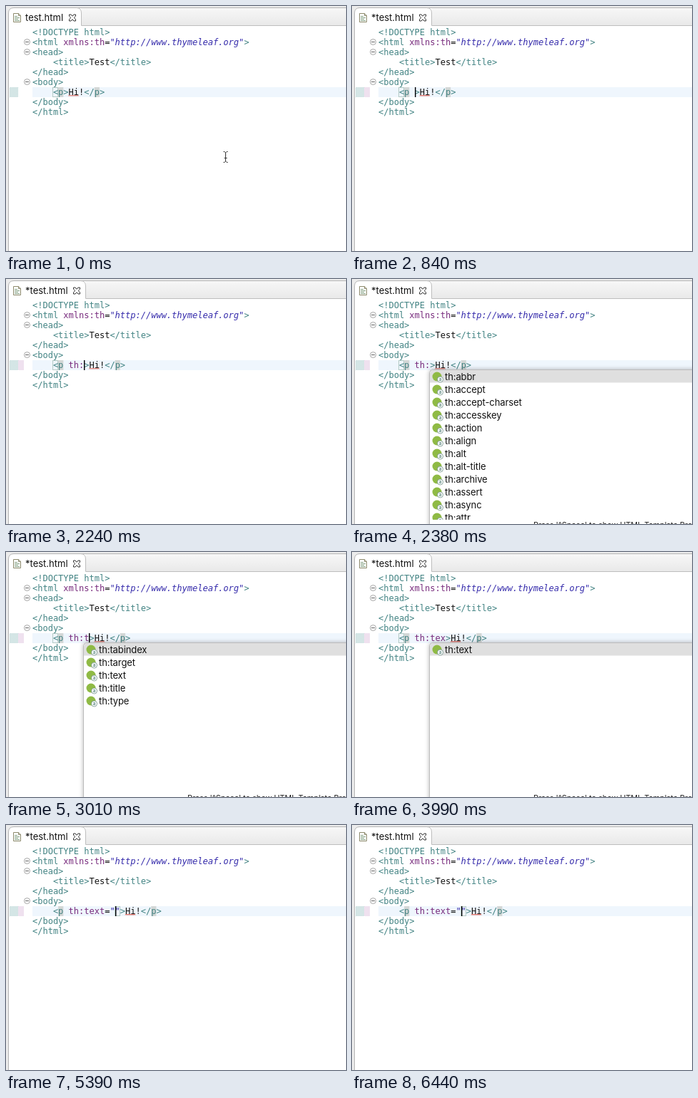
An HTML page for the animation above (6.51 s loop, 476x344 px).

```html
<!DOCTYPE html>
<html lang="en">
<head>
<meta charset="utf-8">
<title>Attribute completion</title>
<style>
  html, body { margin: 0; width: 100%; height: 100%; overflow: hidden; background: #fff; }
  svg { display: block; }
  .code { font: 12px "DejaVu Sans Mono", monospace; fill: #111; white-space: pre; }
  .ui { font: 13px Inter, sans-serif; fill: #111; white-space: pre; }
  .hint { font: 10.8px Inter, sans-serif; fill: #222; }
  .tag { fill: #428383; }
  .attr { fill: #782b7d; }
  .str { fill: #352bab; font-style: italic; }
</style>
</head>
<body>
<svg id="stage" width="476" height="344" viewBox="0 0 476 344">
  <defs>
    <linearGradient id="bar" x1="0" y1="0" x2="0" y2="1">
      <stop offset="0" stop-color="#f7f7f7"/><stop offset="1" stop-color="#e9e9e9"/>
    </linearGradient>
    <pattern id="hatch" width="2" height="2" patternUnits="userSpaceOnUse">
      <path d="M0 0h1v1h-1zM1 1h1v1h-1z" fill="#a9cccc"/>
    </pattern>
    <clipPath id="list"><rect x="109" y="128" width="367" height="210"/></clipPath>
    <filter id="blur" x="-10%" y="-10%" width="120%" height="120%"><feGaussianBlur stdDeviation="3"/></filter>
  </defs>

  <rect width="476" height="344" fill="#ececec"/>
  <path d="M3.5 346V10Q3.5 2.5 11 2.5H480V346Z" fill="#fff" stroke="#b4b4b4"/>
  <rect id="strip" y="3" height="24" fill="url(#bar)"/>
  <path id="tab" fill="none" stroke="#bdbdbd"/>

  <g fill="#fff" stroke="#8d8a6c">
    <path d="M10.5 10.5h7l3 3v9h-10z"/>
    <path d="M17.5 10.5v3h3" fill="none"/>
    <path d="M12 14.5h4M12 16.5h7M12 18.5h5M12 20.5h7" stroke="#86a285"/>
  </g>
  <text id="name" class="ui" x="27" y="21"></text>
  <path id="close" d="M-4.5-4.5h2.5l2 2.3 2-2.3h2.5v2.3l-2.4 2.2 2.4 2.2v2.3h-2.5l-2-2.3-2 2.3h-2.5v-2.3l2.4-2.2-2.4-2.2z" fill="#fff" stroke="#333"/>

  <rect x="37" y="114" width="439" height="14" fill="#eff6fd"/>
  <rect x="5" y="114" width="12" height="14" fill="url(#hatch)"/>
  <rect id="diff" x="17" y="114" width="8" height="14" fill="#efe1ef"/>
  <g id="folds" fill="#fff" stroke="#a3a3a3"></g>
  <g id="marks"></g>
  <g id="lines"></g>
  <text id="edit" class="code" y="125"></text>
  <path id="wave" fill="none" stroke="#e2695f"/>
  <rect id="caret" y="114" width="1.4" height="14" fill="#000"/>

  <g id="popup">
    <path d="M108 350V133Q108 127 114 127H490V350Z" fill="#000" opacity=".28" filter="url(#blur)"/>
    <path d="M108.5 350V133Q108.5 127.500 114 127.500H490V350Z" fill="#fff" stroke="#bcbcbc"/>
    <path d="M109 145.500V133Q109 128 114 128H476V145.500Z" fill="#dfdfdf"/>
    <g id="rows" clip-path="url(#list)"></g>
    <text class="hint" x="254" y="349">Press '^Space' to show HTML Template Proposals</text>
  </g>

  <g id="mouse" fill="none">
    <path id="beam" d="M304.500 204.500h1.500l1.500 1.500 1.500-1.500h1.500M307.500 206v12M304.500 219.500h1.500l1.500-1.500 1.500 1.500h1.500M305.500 213.500h4" stroke="#333"/>
  </g>
</svg>
<script>
const LOOP = 6510, LEFT = 37, CHAR = 7.224;
const $ = id => document.getElementById(id);
const colX = n => LEFT + n * CHAR;
const esc = s => s.replace(/&/g, "&amp;").replace(/</g, "&lt;").replace(/>/g, "&gt;");
const span = (cls, s) => `<tspan class="${cls}">${esc(s)}</tspan>`;
const tag = s => span("tag", s);

// [time, attribute text being typed, caret offset inside it]
const typed = [
  [0, "", 0], [770, " ", 1], [1120, " t", 2], [1330, " th", 3], [2100, " th:", 4],
  [2940, " th:t", 5], [3360, " th:te", 6], [3780, " th:tex", 7], [4130, ' th:text=""', 10]
];
const blink = [
  [0, 0], [140, 1], [420, 0], [630, 1], [980, 0], [1120, 1], [1610, 0], [1750, 1],
  [2380, 0], [2660, 1], [2800, 0], [2940, 1], [3220, 0], [3360, 1], [3570, 0], [3780, 1],
  [3990, 0], [4340, 1], [4550, 0], [4830, 1], [5110, 0], [5390, 1], [5740, 0],
  [5950, 1], [6300, 0], [6440, 1]
];
const lists = [
  [0, ""],
  [2380, "abbr accept accept-charset accesskey action align alt alt-title archive assert async attr"],
  [3010, "tabindex target text title type"],
  [3430, "text"],
  [4130, ""]
];

const at = (steps, t) => steps.filter(s => s[0] <= t).pop();

function row(name, i) {
  const y = 137 + i * 18;
  return `<circle cx="119" cy="${y}" r="6.5" fill="#8fba45"/>
    <circle cx="123.500" cy="${y + 4}" r="4" fill="#fff" stroke="#6d8f86" stroke-width=".8"/>
    <text x="123.500" y="${y + 6.2}" text-anchor="middle" font-family="Inter, sans-serif" font-size="7" fill="#356a62">a</text>
    <text class="ui" x="130" y="${y + 4.500}" letter-spacing="-.1">th:${name}</text>`;
}

function drawStatic() {
  const lines = [
    tag("<!DOCTYPE html>"),
    tag("<html ") + span("attr", "xmlns:th") + "=" + span("str", '"http://www.thymeleaf.org"') + tag(">"),
    tag("<head>"),
    tag("    <title>") + "Test" + tag("</title>"),
    tag("</head>"),
    tag("<body>"),
    "",
    tag("</body>"),
    tag("</html>")
  ];
  $("lines").innerHTML = lines.map((s, i) =>
    `<text class="code" x="${LEFT}" y="${41 + i * 14}">${s}</text>`).join("");
  $("folds").innerHTML = [50.5, 64.5, 106.5].map(y =>
    `<circle cx="29.500" cy="${y}" r="4"/><path d="M27 ${y}h5" stroke="#666"/>`).join("");
  $("edit").setAttribute("x", LEFT);
}

function drawTab(dirty) {
  const end = dirty ? 111.5 : 105.5;
  $("name").textContent = (dirty ? "*" : "") + "test.html";
  $("close").setAttribute("transform", `translate(${dirty ? 99 : 93} 16.500)`);
  $("tab").setAttribute("d", `M${end - 7} 2.500Q${end} 2.500 ${end} 10V27.500H476`);
  $("strip").setAttribute("x", end);
  $("strip").setAttribute("width", 476 - end);
  $("diff").style.display = dirty ? "" : "none";
}

function drawEdit(attr, caret) {
  const [key, value] = attr.split("=");
  $("edit").innerHTML = tag("    <p") + span("attr", key) +
    (value ? "=" + span("str", value) : "") + tag(">") + "Hi!" + tag("</p>");
  const n = attr.length;
  const shade = c => `<rect x="${colX(c)}" y="114" width="${CHAR}" height="14" fill="#d3d7d6"/>`;
  const box = Math.round(colX(value ? 6 + caret : 4)) + .5;
  $("marks").innerHTML = shade(5) + shade(12 + n) +
    `<rect x="${box - 1}" y="114.500" width="7" height="13" fill="none" stroke="#b5cbc6"/>`;
  let d = `M${colX(7 + n)} 126.500`;
  for (let i = 0; i < 7; i++) d += `l1-1.500l1 1.500`;
  $("wave").setAttribute("d", d);
  $("caret").setAttribute("x", Math.round(colX(6 + caret)));
}

let last = "";
function draw(t) {
  const [time, attr, caret] = at(typed, t);
  const list = at(lists, t)[1];
  const on = at(blink, t)[1];
  const state = [time, list, on].join("|");
  if (state === last) return;
  last = state;
  drawTab(time > 0);
  drawEdit(attr, caret);
  $("caret").style.display = on ? "" : "none";
  $("popup").style.display = list ? "" : "none";
  $("rows").innerHTML = list ? list.split(" ").map(row).join("") : "";
  $("mouse").style.display = time > 0 ? "none" : "";
}

drawStatic();
const start = performance.now();
function tick() {
  draw((performance.now() - start) % LOOP);
  requestAnimationFrame(tick);
}
tick();
</script>
</body>
</html>
```
